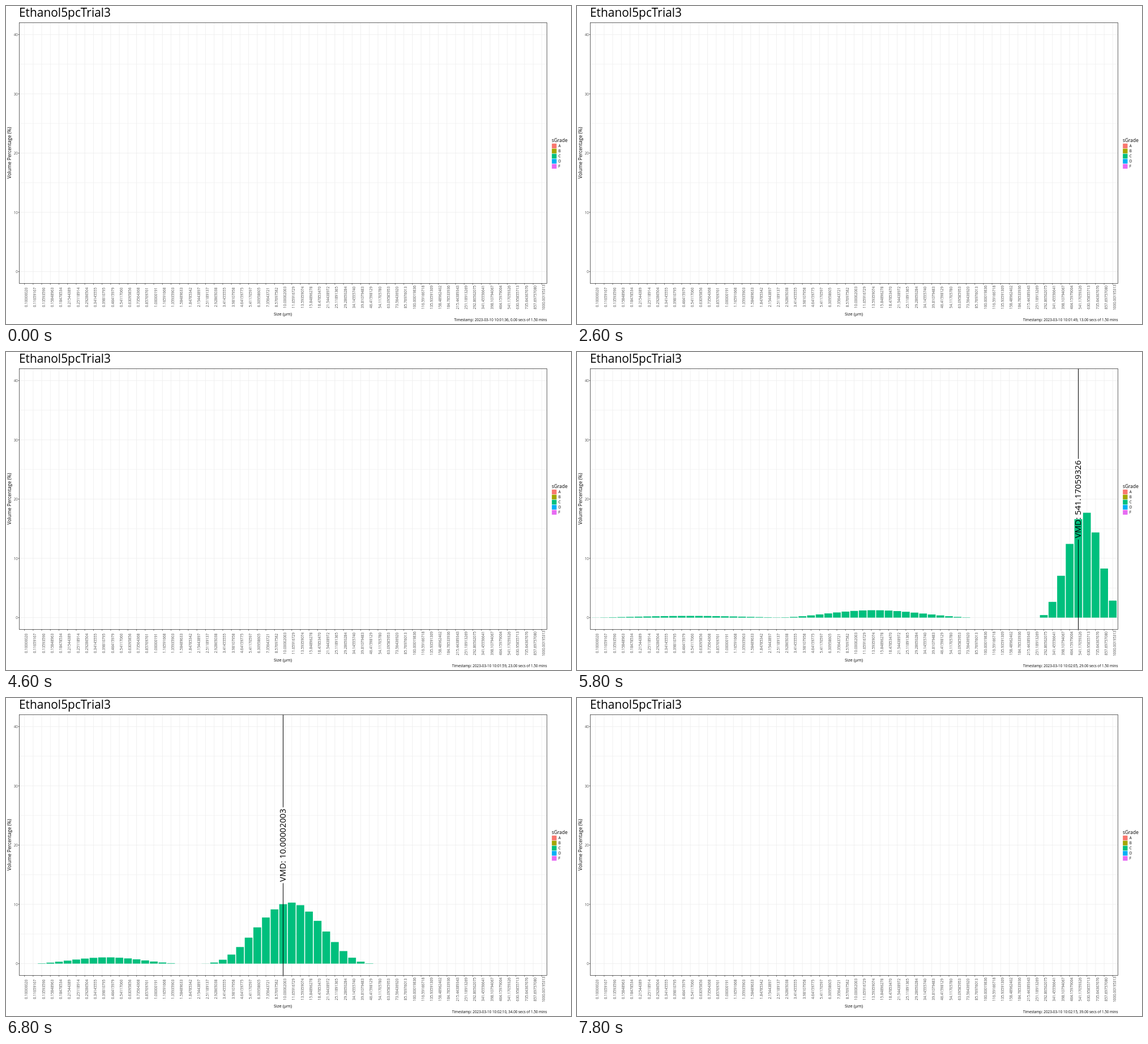
Animation of 998 by 561 pixels, one loop 8 s. Source, as an HTML page:

```html
<!DOCTYPE html>
<html lang="en">
<head>
<meta charset="utf-8">
<title>Particle size distribution</title>
<style>
  html, body { margin: 0; width: 100%; height: 100%; overflow: hidden; background: #fff; }
  svg { display: block; width: 998px; height: 561px; font-family: "Open Sans", sans-serif; }
  text { fill: #000; }
  .tick { font-size: 6.4px; fill: #4d4d4d; }
  .mid { text-anchor: middle; }
  .end { text-anchor: end; }
</style>
</head>
<body>
<svg viewBox="0 0 998 561">
  <g id="grid" stroke="#ebebeb"></g>
  <g id="bars"></g>
  <g id="marker" visibility="hidden">
    <path id="rule" stroke="#000" fill="none"/>
    <text id="vmd" class="mid" font-size="14.75"></text>
  </g>
  <rect x="23.5" y="29.5" width="932" height="460" fill="none" stroke="#333" stroke-width=".75"/>
  <g id="axes" stroke-width=".75"></g>
  <text x="23" y="19" font-size="20.9">Ethanol5pcTrial3</text>
  <text class="mid" x="489" y="545.5" font-size="7.6">Size (µm)</text>
  <text class="mid" font-size="8.5" transform="translate(9.3 259) rotate(-90)">Volume Percentage (%)</text>
  <text id="caption" class="end" x="955.5" y="556.3" font-size="6.33"></text>
  <text x="964" y="239.8" font-size="8.4">sGrade</text>
  <g id="legend"></g>
</svg>
<script>
const LEFT = 23.5, RIGHT = 955.5, TOP = 29.5, BOTTOM = 489.5;
const BINS = 61, LOOP = 8000, STEP = 200;
const GRADES = { A: '#f8766d', B: '#a3a500', C: '#00bf7d', D: '#00b0f6', F: '#e76bf3' };

const $ = id => document.getElementById(id);
const pitch = (RIGHT - LEFT) / (BINS + 0.2);
const xOf = bin => LEFT + pitch * (bin + 0.6);
const yOf = pct => BOTTOM - (pct + 2) * (BOTTOM - TOP) / 44;
const sizeOf = bin => Math.fround(10 ** (bin / 15 - 1) * 1.000001965).toFixed(8);
const range = n => [...Array(n).keys()];

// Cosine arch over the bins, with its own reach on either side of the centre
const hump = (peak, centre, left, right, power = 2) => bin => {
  const d = (bin - centre) / (bin < centre ? left : right);
  return Math.abs(d) < 1 ? peak * Math.cos(d * Math.PI / 2) ** power : 0;
};

const spectrum = (grade, median, ...humps) =>
  ({ grade, median, pct: range(BINS).map(bin => humps.reduce((sum, h) => sum + h(bin), 0)) });

const mixed = spectrum('B', 34,
  hump(0.67, 10, 12.5, 11.3), hump(5.65, 31.7, 11.3, 12.5), hump(6.45, 56.6, 5.3, 4.9, 3));
const heavy = spectrum('C', 56,
  hump(0.29, 11, 13, 13), hump(1.25, 32.3, 11.6, 12.2), hump(17.8, 56.8, 5.9, 5.05, 3));
const fine = spectrum('C', 30,
  hump(1.06, 9.6, 8.9, 8.9), hump(10.3, 30.9, 10.7, 10.2, 3));
const fading = spectrum('C', 31,
  hump(0.95, 9.6, 8.9, 8.9), hump(9.3, 31, 10.7, 10.2, 3), hump(2.7, 56.3, 4.5, 3.6));

// Second at which each measurement appears
const timeline = [[0, null], [15, mixed], [18, null], [28, heavy], [32, fine], [37, fading], [38, null]];

function drawStatic() {
  const bins = range(BINS), levels = range(9).map(i => i * 5), tens = range(5).map(i => i * 10);
  $('grid').innerHTML =
    bins.map(i => `<path d="M${xOf(i)} ${TOP}V${BOTTOM}" stroke-width=".75"/>`).join('') +
    levels.map(p => `<path d="M${LEFT} ${yOf(p)}H${RIGHT}" stroke-width="${p % 10 ? 0.6 : 0.75}"/>`).join('');
  $('axes').innerHTML =
    tens.map(p => `<path d="M21.5 ${yOf(p)}H${LEFT}" stroke="#333"/>
      <text class="tick end" x="21" y="${yOf(p) + 2.6}">${p}</text>`).join('') +
    bins.map(i => `<path d="M${xOf(i)} ${BOTTOM}v2" stroke="#333"/>
      <text class="tick mid" transform="translate(${xOf(i) + 5.6} 514) rotate(-90)">${sizeOf(i)}</text>`).join('');
  $('legend').innerHTML = Object.entries(GRADES).map(([name, color], i) =>
    `<rect x="964.2" y="${242.7 + i * 9}" width="8.3" height="8.3" fill="${color}"/>
     <text x="975.8" y="${249.3 + i * 9}" font-size="6.4">${name}</text>`).join('');
}

function drawSpectrum(data) {
  $('marker').setAttribute('visibility', data ? 'visible' : 'hidden');
  $('bars').innerHTML = '';
  if (!data) return;
  const width = pitch * 0.9;
  $('bars').setAttribute('fill', GRADES[data.grade]);
  $('bars').innerHTML = data.pct.map((p, i) => p > 0.01
    ? `<rect x="${xOf(i) - width / 2}" y="${yOf(p)}" width="${width}" height="${yOf(0) - yOf(p)}"/>` : '').join('');

  const x = Math.floor(xOf(data.median)) + 0.5, middle = 259.7, label = $('vmd');
  label.textContent = `VMD: ${+sizeOf(data.median)}`;
  label.setAttribute('transform', `translate(${x + 4.9} ${middle}) rotate(-90)`);
  const gap = label.getComputedTextLength() / 2 + 2.5;
  $('rule').setAttribute('d', `M${x} ${TOP}V${middle - gap}M${x} ${middle + gap}V${BOTTOM}`);
}

function drawCaption(second) {
  const clock = 96 + second, pad = n => String(n).padStart(2, '0');
  $('caption').textContent =
    `Timestamp: 2023-03-10 10:${pad(Math.floor(clock / 60))}:${pad(clock % 60)}, ${second.toFixed(2)} secs of 1.50 mins`;
}

let shown = -1;
function render(elapsed) {
  const second = Math.floor(elapsed % LOOP / STEP);
  if (second === shown) return;
  shown = second;
  drawCaption(second);
  drawSpectrum(timeline.findLast(([start]) => start <= second)[1]);
}

drawStatic();
const began = performance.now();
function tick() {
  render(performance.now() - began);
  requestAnimationFrame(tick);
}
tick();
</script>
</body>
</html>
```
